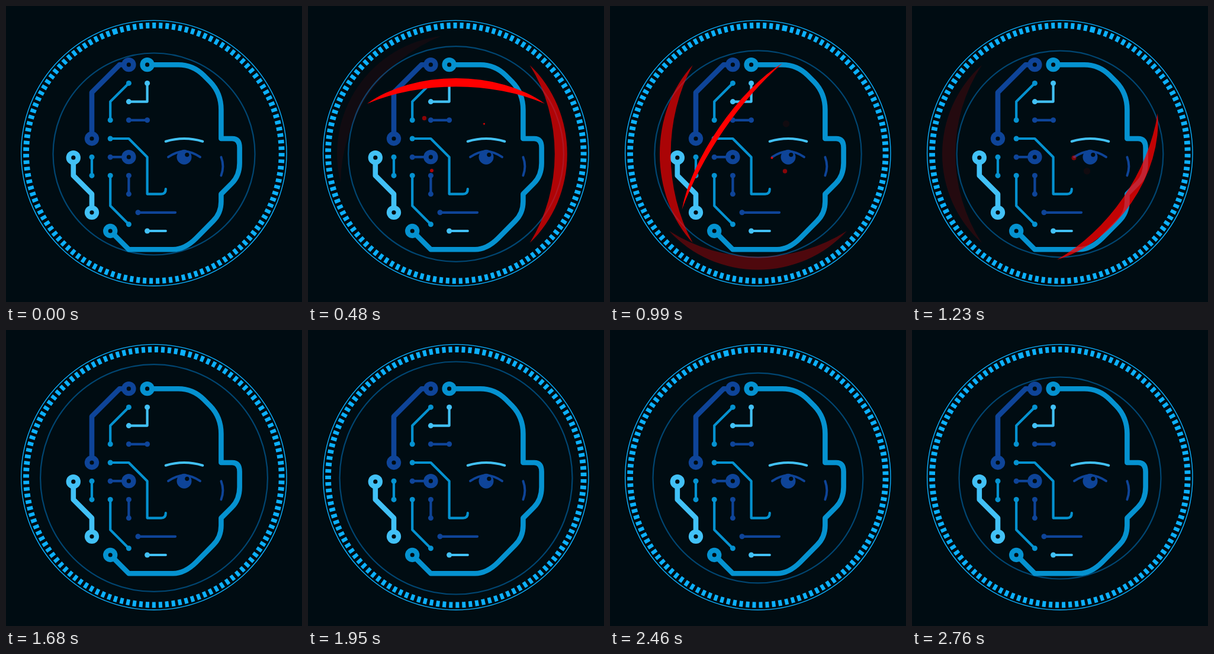
An HTML page for the animation above (2790 ms loop, 500x500 px).

```html
<!DOCTYPE html>
<html>
<head>
<meta charset="utf-8">
<style>
  html, body { margin: 0; width: 100%; height: 100%; overflow: hidden; background: #000c12; }
  svg { display: block; width: 100%; height: 100%; }
  path, circle { fill: none; }
  #face { stroke-linejoin: round; stroke-linecap: round; }
  #arcs path, #sparks circle { fill: #f00; }
</style>
</head>
<body>
<svg viewBox="0 0 500 500">
  <circle cx="249.8" cy="248.6" r="224.2" stroke="#0cb0ff" stroke-width="1.4"/>
  <circle id="dial" r="215.8" stroke="#0cb0ff" stroke-width="9.8" pathLength="1355.5" stroke-dasharray="6 5"/>
  <circle id="pulse" cx="250" cy="250" stroke="#004672" stroke-width="2.2"/>
  <g id="face" transform="translate(113.8 99.2) scale(31.2)"></g>
  <g id="arcs" transform="translate(250 250)"></g>
  <g id="sparks"></g>
</svg>
<script>
const BG = '#000c12', BLUE = '#0592d0', DARK = '#0e4498', LIGHT = '#42c1f6';
const LOOP = 2790, STEP = 30, TURN = 1380;
const THIN = .135, THICK = .276;
const $ = id => document.getElementById(id);

function add(parent, tag, attrs) {
  const el = document.createElementNS('http://www.w3.org/2000/svg', tag);
  set(el, attrs);
  return parent.appendChild(el);
}
function set(el, attrs) {
  for (const key in attrs) el.setAttribute(key, attrs[key]);
}

// The face sits on a square grid, one unit per cell
const face = $('face');
const disc = (color, cx, cy, r) => add(face, 'circle', { cx, cy, r, style: `fill:${color}` });
const line = (color, d, width = THIN) => add(face, 'path', { d, stroke: color, 'stroke-width': width });

function node(color, x, y) {
  disc(color, x, y, .39);
  disc(BG, x, y, .115);
}
function wire(color, d, ends = 2) {
  const path = line(color, d);
  for (const at of [0, path.getTotalLength()].slice(0, ends)) {
    const { x, y } = path.getPointAtLength(at);
    disc(color, x, y, .144);
  }
}
function cable(color, d) {
  const path = line(color, d, THICK);
  for (const at of [0, path.getTotalLength()]) {
    const { x, y } = path.getPointAtLength(at);
    node(color, x, y);
  }
}

cable(BLUE, 'M4 0H5.68Q6.48 0 7.06 .58L7.41 .93Q8 1.54 8 2.44V4H8.6Q9 4 9 4.5V5.32'
  + 'Q9 6 8.58 6.42L8 7V7.4Q8 8.04 7.57 8.46L6.64 9.4Q6.03 10 5.4 10H3L2 9');
cable(DARK, 'M3 0H2.5L1 1.5V4');
cable(LIGHT, 'M0 5.03V6L1 7V8');

['M3 1L2 2V3', 'M1 5V6', 'M2 6V7.64L3 8.64'].forEach(d => wire(BLUE, d));
['M3 3H4', 'M2 5H3', 'M3 6V7'].forEach(d => wire(DARK, d));
wire(LIGHT, 'M4 1V2H3');
wire(BLUE, 'M2 4H3L4 5V7H4.75Q5 7 5 6.73', 1);
wire(DARK, 'M3.5 8H5.52', 1);
wire(LIGHT, 'M4 9H5', 1);
node(DARK, 3, 5);

line(LIGHT, 'M5 4.15Q6 3.85 7 4.15');
line(DARK, 'M5.135 5Q6 4.39 6.865 5M8 5Q8.19 5.5 8 6', .125);
disc(DARK, 6, 5, .4);
disc(BG, 6.155, 4.875, .115);

// Crescents that flip over across the centre while fading in and out
const ARC_LIFE = 1130, FLIP_AT = 615;
const arcs = [[0, 0], [90, 165], [-55.5, 450]].map(([tilt, start]) => ({
  tilt, start,
  el: add($('arcs'), 'path', { d: 'M-150 -134A200 200 0 0 1 150 -134A272 272 0 0 0 -150 -134Z' })
}));

// Sparks that grow and fade: centre and start time
const SPARK_LIFE = 720;
const sparks = [[196.5, 189.5, 40], [209, 278, 120], [297.5, 199, 300], [295.5, 279, 540], [273.5, 256.5, 750]]
  .map(([cx, cy, start]) => ({ start, el: add($('sparks'), 'circle', { cx, cy }) }));

// Swings there and back, with a quick burst halfway
function swing(t) {
  const p = .5 - Math.abs(t - TURN) / TURN;
  return -1.1 + 15.4 * p + 9.4 * Math.tanh(p / .05);
}

// Eased between the turning points of the pulse
const beats = [[0, 170.5], [540, 182], [1130, 174], [1950, 196.5], [2760, 170.5]];
function radius(t) {
  const i = Math.max(1, beats.findIndex(([time]) => time >= t));
  const [t0, r0] = beats[i - 1], [t1, r1] = beats[i];
  const u = (t - t0) / (t1 - t0);
  return r0 + (r1 - r0) * u * u * u * (10 - 15 * u + 6 * u * u);
}

function draw(t) {
  set($('dial'), { transform: `translate(249.8 248.6) rotate(${swing(t) - 90})` });
  set($('pulse'), { r: radius(t) });
  for (const { el, tilt, start } of arcs) {
    const age = t - start;
    const fade = 1.23 - Math.abs(age - ARC_LIFE / 2) / 460;
    set(el, {
      transform: `rotate(${tilt}) scale(1 ${Math.tanh((FLIP_AT - age) / 180)})`,
      opacity: Math.max(0, Math.min(1, fade))
    });
  }
  for (const { el, start } of sparks) {
    const u = Math.max(0, Math.min(1, (t - start) / SPARK_LIFE));
    set(el, { r: 6 * u, opacity: 1 - u ** 1.6 });
  }
}

const begin = performance.now();
function tick() {
  const t = (performance.now() - begin) % LOOP;
  draw(Math.floor(t / STEP) * STEP);
  requestAnimationFrame(tick);
}
tick();
</script>
</body>
</html>
```
